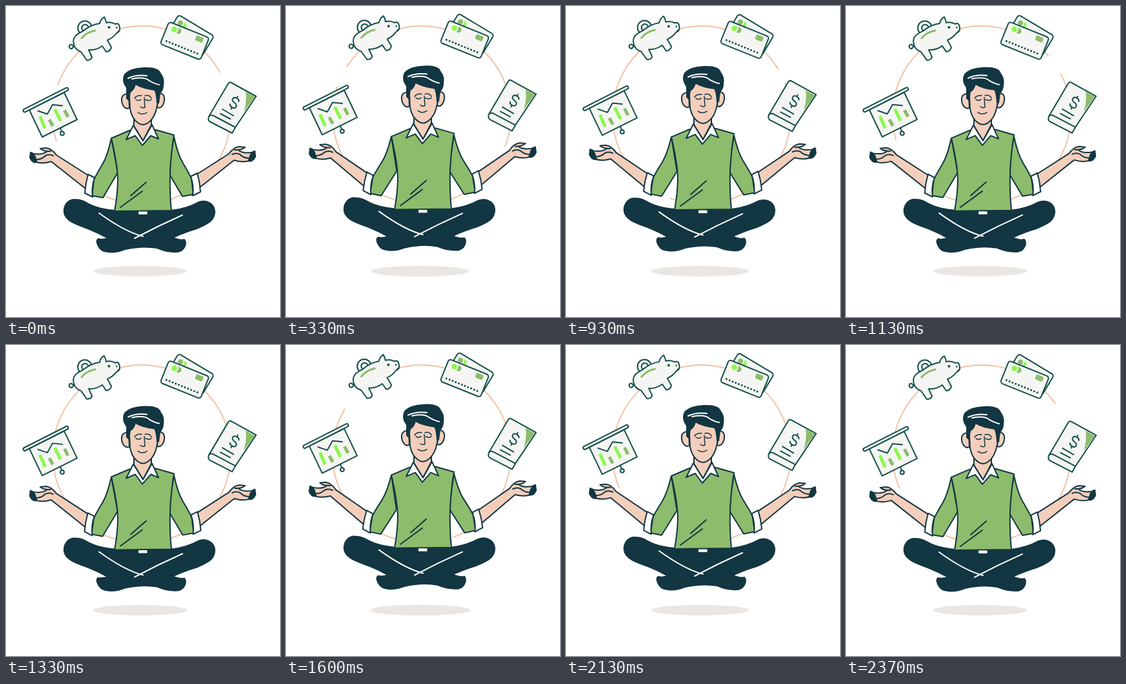
Animation of 424x482 px, one loop 2.41 s. Source, as an HTML page:

```html
<!DOCTYPE html>
<html lang="en">
<head>
<meta charset="utf-8">
<title>Balanced finances</title>
<style>
  html, body { margin: 0; width: 100%; height: 100%; overflow: hidden; background: #fff; }
  svg { display: block; width: 100vw; height: 100vh; }
  .item { stroke: #14504a; fill: #f5f5f3; }
  .man { stroke: #123642; fill: none; }
  .line { fill: none; }
  .skin { fill: #f3cebb; }
  .white { fill: #fff; }
  .knit { fill: #8dbc6c; }
  .dark { fill: #123642; }
  .leaf { fill: #8dbc6c; stroke: none; }
  .lime { fill: #8cf84a; stroke: none; }
  .gap { stroke: #f5f5f3; }
  .bar { fill: none; stroke-width: 5; stroke-linecap: butt; }
  .light { fill: none; stroke: #fff; }
</style>
</head>
<body>
<svg viewBox="0 0 424 482" stroke-width="2" stroke-linecap="round" stroke-linejoin="round">
  <ellipse id="shadow" cx="207.5" cy="411" fill="#eae6e3"/>
  <circle id="ring" cx="210" cy="169" r="138" pathLength="360" fill="none" stroke="#f2c3a5"
    stroke-linecap="butt" stroke-dasharray="154.5 13.5 27 9.5 131.9 23.6"/>

  <g id="chart" class="item">
    <path d="M36 161L90 134L110 176L56 203Z"/>
    <path d="M29 162L94 129" stroke-width="6.8"/>
    <path d="M29 162L94 129" stroke="#f5f5f3" stroke-width="2.8"/>
    <path class="line" d="M49.500 162.500L64 167.500L72 153L87 154.500M84 189L86 194"/>
    <circle class="white" cx="87" cy="197.500" r="2.900"/>
    <path class="bar" stroke="#8cf84a" d="M52.500 171L60.500 189.500M75.500 160L84.500 178"/>
    <path class="bar" stroke="#8dbc6c" d="M67 176L72.500 186M90.500 161.500L96 172"/>
  </g>

  <g id="pig" class="item">
    <path class="line" d="M105 62C102 69 97 66 98 61Q101 58 104 62"/>
    <circle cx="122" cy="34" r="10.800"/>
    <circle cx="122.500" cy="34" r="5.200"/>
    <path d="M105 60C102 49 108 44 119 39Q131 29 145 27Q146 21 152 17Q155 22 155 26Q162 24 169 28Q175 25 176 34Q177 40 171 42Q166 49 157 53L163 64Q162 70 155 71L149 62Q139 69 128 68L133 79Q132 84 125 84L116 71Q107 68 105 60Z"/>
    <path class="line" d="M117 50Q124 41 138 38" style="stroke:#8dbc6c" stroke-width="3"/>
    <circle cx="159.500" cy="33" r="1" fill="#14504a"/>
    <path class="line" d="M171 33L171.500 34M174 39L173 40"/>
  </g>

  <g id="cards" class="item">
    <g transform="translate(285 46) rotate(31)">
      <rect x="-32" y="-18.500" width="64" height="37" rx="4"/>
      <circle class="lime" cx="-17" cy="-9" r="4.500"/>
      <circle class="leaf gap" cx="-23" cy="-9" r="5"/>
    </g>
    <g transform="translate(276.500 54) rotate(22)">
      <rect x="-33.500" y="-18.500" width="67" height="37" rx="4"/>
      <circle class="leaf" cx="-14.500" cy="-10.500" r="4.500"/>
      <circle class="lime gap" cx="-21.500" cy="-10.500" r="5.300"/>
      <rect class="leaf" x="14" y="-15" width="12" height="8" rx="2"/>
      <path class="line" d="M-26 11H26" stroke-width="3" stroke-dasharray="0 5.150"/>
    </g>
  </g>

  <g id="book" class="item">
    <path d="M344 120Q346 117 349 119L387 140L355 188L350 197L315 179Q312 176 314 171Z"/>
    <path class="line" d="M314 171Q317 168 321 170L355 188M335 160L352 170M332 167L347 175"/>
    <path class="leaf" d="M371 133L385 141L368 164Q373 147 371 133Z"/>
    <path class="line" transform="translate(353.500 150) rotate(28)" d="M5 -5Q4 -8 0 -8C-7 -8 -7 -1 0 0C7 1 7 8 0 8Q-4 8 -5 5M0 -11V-8M0 8V11"/>
  </g>

  <g id="man" class="man">
    <defs>
      <g id="limb">
        <path class="skin" d="M128 263L78 231Q71 221 62 220L53 221Q58 225 64 225Q57 231 43 229L38 227Q37 238 47 242Q57 245 70 241L123 283Z"/>
        <path class="dark" d="M38 227L43 230Q46 234 46 237L48 242Q41 244 37 235Z"/>
        <path class="line" d="M47 238Q55 238 61 232Q67 229 73 232M64 225L69 225"/>
        <path class="knit" d="M163 205Q157 232 150 244Q137 266 136 270L133 294L150 297L173 258Z"/>
        <path class="white" d="M127 261L137 266Q132 281 134 296L122 290Q123 275 127 261Z"/>
      </g>
    </defs>
    <g class="arm"><use href="#limb"/></g>
    <g transform="matrix(-1 0 0 1 423 -2)"><g class="arm"><use href="#limb"/></g></g>

    <path class="dark" d="M108 300C96 299 89 309 90 320C92 334 111 339 129 346Q144 352 158 360Q147 363 143 361C137 364 144 378 152 380Q166 384 184 377Q211 371 234 375Q250 382 266 381C277 379 280 367 276 362Q269 364 258 359Q275 351 295 345C314 337 323 332 323 318C322 305 309 300 298 304Q280 314 256 317L168 317Q139 314 123 304Q115 300 108 300Z"/>
    <path class="light" d="M144 321Q184 350 212 357M273 324Q235 341 199 360"/>

    <path class="knit" d="M191 193L163 205Q172 243 173 268Q173 290 168 318L256 317Q253 292 254 255Q256 222 260 200L232 192Z"/>
    <path d="M217 273L193 294M211 287L177 312"/>
    <rect x="205" y="318.500" width="13.500" height="4.500" fill="#fff" stroke="none"/>
    <path class="skin" d="M198 174V186L212 209L225 184V172Z"/>
    <path class="white" d="M197 185L186 207L200 201L211 216L224 201L236 206L226 184L212 209Z"/>

    <path class="skin" d="M190 138C184 134 178 139 179 147C180 156 186 161 191 158ZM235 137C241 133 246 138 245 146C244 154 239 160 234 157Z"/>
    <path class="skin" d="M190 121L192 160Q195 175 204 181Q212 187 220 181Q231 173 234 154L236 120Z"/>
    <path class="dark" d="M190 146L187 143V131Q188 127 184 122Q180 114 184 106Q192 97 214 96Q236 95 239 105Q245 112 243 123Q243 130 238 135L236 150H234Q233 134 230 130Q212 128 200 121Q198 130 192 133Z"/>
    <path class="light" d="M189 112Q201 106 218 108M195 113Q215 109 222 116Q231 121 237 122"/>
    <path stroke-width="1.500" d="M199 143Q202 138 210 139M215 139Q222 137 225 143M201 145Q205 148 209 145M216 145Q221 148 225 145M214 142L215 157Q211 159 208 156M204 165Q211 170 218 165"/>
  </g>
</svg>
<script>
const LOOP = 2410;
// Rise in pixels; the pig also tips up around its tail.
const lifts = { man: 4.5, chart: 6, pig: 0.8, cards: 3.6, book: 6 };
const byId = id => document.getElementById(id);
const arms = document.querySelectorAll('.arm');

function draw(now) {
  const turn = now % LOOP / LOOP;
  const rise = (1 - Math.cos(turn * 4 * Math.PI)) / 2; // two breaths per ring turn
  for (const id in lifts) {
    const tip = id === 'pig' ? -2.5 * rise : 0;
    byId(id).setAttribute('transform', `translate(0 ${-lifts[id] * rise}) rotate(${tip} 104 64)`);
  }
  for (const arm of arms) arm.setAttribute('transform', `rotate(${3 * rise} 163 205)`);
  byId('ring').setAttribute('transform', `rotate(${360 * turn - 5} 210 169)`);
  byId('shadow').setAttribute('rx', 72.5 + 6.5 * rise);
  byId('shadow').setAttribute('ry', 8 + 0.5 * rise);
}

const start = performance.now();
function tick() {
  draw(performance.now() - start);
  requestAnimationFrame(tick);
}
tick();
</script>
</body>
</html>
```
